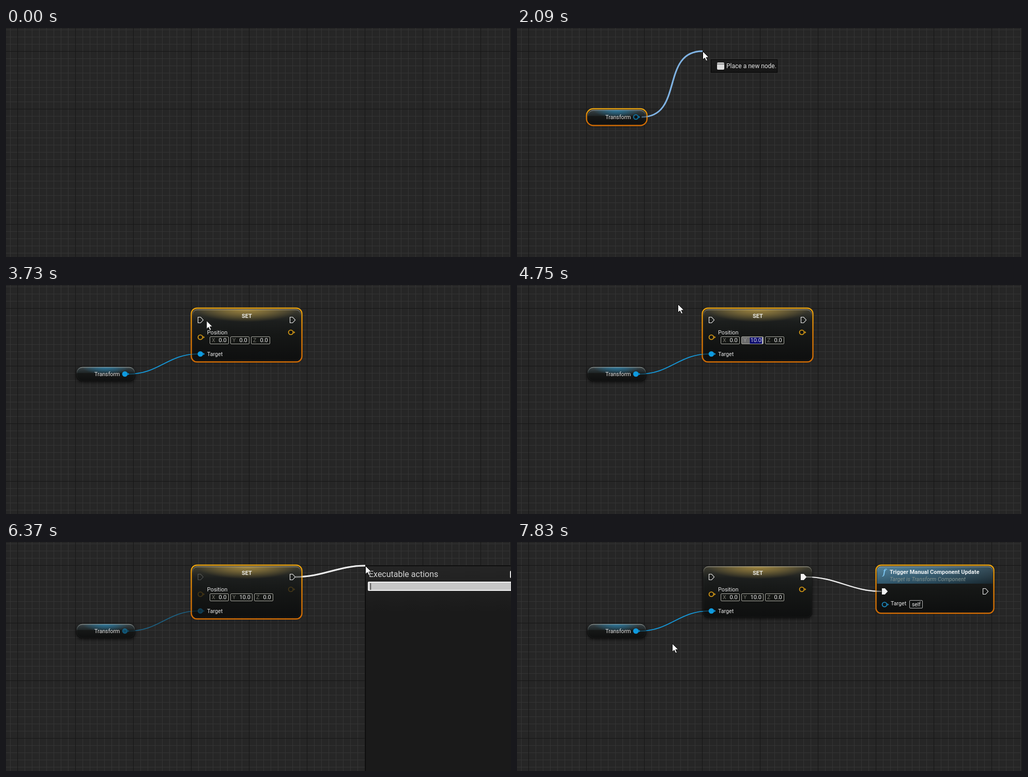
Recreate the animation shown at these times as an HTML page with a canvas. Size 977x445 px, loop 8 s.

```html
<!DOCTYPE html>
<html lang="en">
<head>
<meta charset="utf-8">
<title>Node graph</title>
<style>
html, body { margin: 0; width: 100%; height: 100%; overflow: hidden; background: #262626; }
canvas { display: block; }
</style>
</head>
<body>
<canvas id="stage" width="977" height="445"></canvas>
<script>
const W = 977, H = 445, LOOP = 8000;
const ctx = document.getElementById('stage').getContext('2d');
const SANS = 'Roboto, "Open Sans", sans-serif';
const BLUE = '#0f9ade', GOLD = '#cf9416', WHITE = '#f2f2f2';

// The screen updates in discrete ticks of roughly 205 ms.
const TICKS = [0, 220, 420, 630, 840, 1050, 1270, 1470, 1680, 1880, 2090, 2290,
  2490, 2700, 2920, 3120, 3310, 3510, 3730, 3930, 4140, 4340, 4550, 4750,
  4950, 5160, 5370, 5570, 5780, 5990, 6170, 6380, 6590, 6790, 6990, 7210,
  7420, 7630, 7830];

// Pointer path: tick, x, y
const PATH = [[1, 2, 118], [4, 146, 157], [5, 146, 157], [7, 232, 173],
  [10, 359, 45], [11, 359, 45], [13, 313, 32], [17, 313, 32], [19, 462, 106],
  [22, 462, 106], [23, 311, 37], [26, 554, 68], [29, 695, 46], [30, 695, 46],
  [32, 670, 35], [35, 670, 35], [38, 300, 197]];

const QUERY_A = { 11: '', 12: 's', 13: 'set p', 14: 'set posi', 15: 'set posi' };
const QUERY_B = { 30: '', 31: 'm', 32: 'man', 33: 'manu', 34: 'manual' };

function pointerAt(tick) {
  let i = 0;
  while (i < PATH.length - 2 && PATH[i + 1][0] < tick) i++;
  const [ta, xa, ya] = PATH[i], [tb, xb, yb] = PATH[i + 1];
  const u = Math.min(1, Math.max(0, (tick - ta) / (tb - ta)));
  const k = u * u * (3 - 2 * u);
  return [xa + (xb - xa) * k, ya + (yb - ya) * k];
}

function rect(x, y, w, h, color) {
  ctx.fillStyle = color;
  ctx.fillRect(x, y, w, h);
}

function roundPath(x, y, w, h, r) {
  ctx.beginPath();
  ctx.roundRect(x, y, w, h, r);
}

function poly(points, fill, stroke, width = 1) {
  ctx.beginPath();
  points.forEach(([x, y]) => ctx.lineTo(x, y));
  ctx.closePath();
  if (fill) { ctx.fillStyle = fill; ctx.fill(); }
  if (stroke) { ctx.strokeStyle = stroke; ctx.lineWidth = width; ctx.stroke(); }
}

function text(str, x, y, size, color, style = '') {
  ctx.font = `${style} ${size}px ${SANS}`;
  ctx.fillStyle = color;
  ctx.fillText(str, x, y);
  return ctx.measureText(str).width;
}

function vertical(y0, y1, ...colors) {
  const g = ctx.createLinearGradient(0, y0, 0, y1);
  colors.forEach((c, i) => g.addColorStop(i / (colors.length - 1), c));
  return g;
}

function grid() {
  rect(0, 0, W, H, '#262626');
  for (let x = 8; x < W; x += 14) rect(x, 0, 1, H, '#343434');
  for (let y = 3; y < H; y += 14) rect(0, y, W, 1, '#343434');
  for (let x = 22; x < W; x += 112) rect(x, 0, 1, H, '#161616');
  for (let y = 45; y < H; y += 112) rect(0, y, W, 1, '#161616');
  rect(975, 0, 2, H, '#1e1e1e');
}

function wire([x0, y0], [x1, y1], color, width, alpha = 1) {
  const d = (Math.abs(x1 - x0) + Math.abs(y1 - y0)) / 3;
  ctx.save();
  ctx.globalAlpha = alpha;
  ctx.beginPath();
  ctx.moveTo(x0, y0);
  ctx.bezierCurveTo(x0 + d, y0, x1 - d, y1, x1, y1);
  ctx.strokeStyle = color;
  ctx.lineWidth = width;
  ctx.stroke();
  ctx.restore();
}

function body(x, y, w, h, r, selected, paintTop) {
  ctx.save();
  ctx.shadowColor = 'rgba(0,0,0,.75)';
  ctx.shadowBlur = 6;
  ctx.shadowOffsetY = 2;
  roundPath(x, y, w, h, r);
  ctx.fillStyle = vertical(y, y + h, 'rgba(36,39,38,.92)', 'rgba(22,24,23,.9)', 'rgba(14,15,15,.92)');
  ctx.fill();
  ctx.restore();

  ctx.save();
  roundPath(x, y, w, h, r);
  ctx.clip();
  paintTop();
  ctx.restore();

  roundPath(x + .5, y + .5, w - 1, h - 1, r);
  ctx.strokeStyle = vertical(y, y + h, 'rgba(8,8,8,.4)', '#0a0a0a');
  ctx.lineWidth = 1;
  ctx.stroke();
  roundPath(x + 1, y + 1, w - 2, h - 2, r);
  ctx.strokeStyle = vertical(y, y + Math.min(h, 14), 'rgba(215,215,205,.75)', 'rgba(150,150,150,.08)');
  ctx.stroke();

  if (selected) {
    roundPath(x - 1.5, y - 2, w + 3, h + 4.5, r + 2);
    ctx.strokeStyle = vertical(y, y + h, '#e5a011', '#d87a05', '#cd6a04');
    ctx.lineWidth = 2.4;
    ctx.stroke();
  }
}

function glow(cx, y, rx, ry, color) {
  ctx.save();
  ctx.translate(cx, y);
  ctx.scale(rx, ry);
  const g = ctx.createRadialGradient(0, 0, 0, 0, 0, 1);
  g.addColorStop(0, `rgba(${color},.85)`);
  g.addColorStop(.5, `rgba(${color},.45)`);
  g.addColorStop(1, `rgba(${color},0)`);
  rect(-1, 0, 2, 1, g);
  ctx.restore();
}

function faded(alpha, draw) {
  ctx.save();
  ctx.globalAlpha = alpha;
  draw();
  ctx.restore();
}

function dataPin(x, y, color, filled) {
  ctx.beginPath();
  ctx.arc(x, y, 4.4, 0, 7);
  ctx.fillStyle = filled ? color : '#101414';
  ctx.fill();
  ctx.strokeStyle = color;
  ctx.lineWidth = 1.9;
  ctx.stroke();
  poly([[x + 5.5, y - 2.5], [x + 8.5, y], [x + 5.5, y + 2.5]], color);
}

function execPin(x, y, filled) {
  poly([[x, y - 5.5], [x + 5, y - 5.5], [x + 10, y], [x + 5, y + 5.5], [x, y + 5.5]],
    filled ? WHITE : null, WHITE, 1.1);
}

function getterNode(selected, connected, alpha) {
  body(136, 159, 114, 28, 11, selected, () => {
    rect(136, 159, 114, 12, vertical(159, 171, 'rgba(110,135,145,.35)', 'rgba(70,100,115,.15)'));
    glow(193, 159, 46, 15, '38,128,172');
  });
  text('Transform', 171, 177, 10.7, '#e8e8e8');
  faded(alpha, () => dataPin(230, 173, BLUE, connected));
}

function fields(yValue, editing) {
  let x = 394.5;
  for (const [axis, value] of [['X', '0.0'], ['Y', yValue], ['Z', '0.0']]) {
    const active = editing && axis === 'Y';
    ctx.font = `11px ${SANS}`;
    const tw = ctx.measureText(value).width, w = Math.round(21 + tw);
    roundPath(x, 100.5, w, 14, 1.5);
    ctx.fillStyle = active ? '#6c6c6c' : '#141614';
    ctx.fill();
    ctx.strokeStyle = '#a9a9a0';
    ctx.lineWidth = 1;
    ctx.stroke();
    if (active) rect(x + 16, 102, tw + 2, 12, '#05056e');
    text(axis, x + 3.5, 111, 10.7, active ? '#9a9a9a' : '#74746c');
    text(value, x + 17, 111, 11, '#eeeeee');
    if (active) rect(Math.round(x + 18 + tw), 102, 1, 12, '#ffffff');
    x += w + 4;
  }
}

function setterNode(tick, selected, dim) {
  const alpha = dim ? .25 : 1;
  body(360, 47, 211, 100, 9, selected, () => {
    rect(360, 47, 211, 24, vertical(47, 71, 'rgba(130,118,80,.35)', 'rgba(90,85,60,0)'));
    glow(466, 47, 98, 25, '178,148,66');
  });
  text('SET', 456, 64, 11, '#e9e9e4', 'bold');
  text('Position', 389, 96, 10.8, '#e8e8e8');
  text('Target', 389, 138, 10.7, '#e8e8e8');
  faded(alpha, () => {
    execPin(371.5, 68);
    dataPin(376, 101.5, GOLD);
    dataPin(551, 92, GOLD);
    dataPin(376, 134, BLUE, true);
  });
  execPin(549.5, 68, tick >= 35);
  fields(tick < 21 ? '0.0' : tick === 21 ? '10' : '10.0', tick >= 20 && tick < 27);
}

function functionMark(x, y, size) {
  ctx.font = `italic bold ${size}px "Noto Serif", "Liberation Serif", serif`;
  ctx.fillStyle = '#7cc4ee';
  ctx.fillText('f', x, y);
}

function callNode() {
  body(696, 47, 225, 89, 8, true, () => {
    const g = ctx.createLinearGradient(696, 0, 921, 0);
    g.addColorStop(0, '#427590');
    g.addColorStop(.5, '#315a70');
    g.addColorStop(1, '#20333d');
    rect(696, 47, 225, 34, g);
    rect(696, 47, 225, 34, vertical(47, 81, 'rgba(150,190,210,.2)', 'rgba(0,0,0,.25)'));
  });
  functionMark(708, 63, 14);
  text('Trigger Manual Component Update', 721, 62, 11, '#eef2f4', 'bold');
  text('Target is Transform Component', 721, 76, 10.7, '#82918c', 'italic');
  execPin(706.5, 96, true);
  execPin(901.5, 96);
  dataPin(711, 121.5, '#1c86bb');
  text('Target', 723, 123, 10.7, '#e8e8e8');
  roundPath(759.5, 113.5, 25, 15, 1.5);
  ctx.fillStyle = '#101212';
  ctx.fill();
  ctx.strokeStyle = '#b5b5b5';
  ctx.lineWidth = 1;
  ctx.stroke();
  text('self', 764, 125, 10.3, '#eeeeee');
}

function tip(x, y, label, variable) {
  x = Math.round(x + 16);
  y = Math.round(y + 16);
  ctx.font = `12px ${SANS}`;
  const w = Math.round(32 + ctx.measureText(label).width);
  rect(x, y, w, 26, '#050505');
  rect(x + 1, y + 1, w - 2, 24, vertical(y, y + 26, '#1d1d1d', '#151515'));
  if (variable) {
    pill(x + 11, y + 10, BLUE);
  } else {
    roundPath(x + 12, y + 6, 14, 14, 2);
    ctx.fillStyle = '#dcdcdc';
    ctx.fill();
    rect(x + 12, y + 8, 14, 2, '#8d8d8d');
  }
  text(label, x + 30, y + 17, 12, '#e4e4e4');
}

function pill(x, y, color) {
  roundPath(x, y, 14, 6, 3);
  ctx.fillStyle = color;
  ctx.fill();
  rect(x + 2, y + 2.5, 10, 1, 'rgba(60,40,0,.6)');
}

function menuPanel(x, y, w) {
  rect(x, y, w, H - y, '#080808');
  rect(x + 1, y + 1, w - 2, H - y, vertical(y, y + 90, '#252525', '#1a1a1a'));
}

function searchBox(x, y, w, query) {
  roundPath(x, y, w, 18, 2);
  ctx.fillStyle = '#f0f0f0';
  ctx.fill();
  rect(x + 2, y + 2, w - 4, 14, '#c6c6c6');
  const tw = text(query, x + 5, y + 13, 12, '#101010');
  rect(Math.round(x + 5 + tw), y + 3, 1, 13, '#000000');
}

function header(label, x, y) {
  poly([[x - 2, y - 3], [x - 2, y + 3], [x - 8, y + 3]], '#9c9c9c');
  text(label, x, y + 4.5, 12, '#e2e2e2', 'bold');
}

// Entry label with the matching part lit green.
function entry(label, start, length, x, y, selected) {
  const ink = selected ? '#0c0c0c' : '#dedede';
  ctx.font = `12.75px ${SANS}`;
  const before = ctx.measureText(label.slice(0, start)).width;
  const hit = label.slice(start, start + length);
  const hw = ctx.measureText(hit).width;
  rect(x + before, y - 8, hw, 16, '#289000');
  text(label.slice(0, start), x, y + 4.5, 12.75, ink);
  text(hit, x + before, y + 4.5, 12.75, '#f0f0f0');
  text(label.slice(start + length), x + before + hw, y + 4.5, 12.75, ink);
}

function checkbox(x, y) {
  roundPath(x, y, 14, 14, 2);
  ctx.fillStyle = '#dddddd';
  ctx.fill();
  ctx.beginPath();
  ctx.moveTo(x + 3, y + 7);
  ctx.lineTo(x + 6, y + 10.5);
  ctx.lineTo(x + 11.5, y + 3);
  ctx.strokeStyle = '#151515';
  ctx.lineWidth = 2;
  ctx.stroke();
}

function pinMenu(query) {
  menuPanel(359, 45, 410);
  ctx.beginPath();
  ctx.arc(371.5, 71.5, 5.5, 0, 7);
  ctx.fillStyle = '#2b9fdd';
  ctx.fill();
  text('Actions taking a(n) Transform', 382, 67, 16, '#d4d4d4');
  text('Component Object Reference', 382, 86, 16, '#d4d4d4');
  checkbox(639, 64);
  text('Context Sensitive', 656, 75, 12, '#d4d4d4');
  poly([[754, 67], [759, 71], [754, 75]], '#8a8a8a');
  searchBox(364, 95, 400, query);
  if (!query) return;
  ctx.beginPath();
  ctx.moveTo(751, 99); ctx.lineTo(760, 108);
  ctx.moveTo(760, 99); ctx.lineTo(751, 108);
  ctx.strokeStyle = '#111111';
  ctx.lineWidth = 2;
  ctx.stroke();
  header('Variables', 374, 124);
  header('Transform Component', 384, 142);
  rect(364, 152, 400, 19, '#8a8a8a');
  pill(397, 158, '#d3a21c');
  entry('Set Position', 0, query.length, 415.5, 161.5, true);
}

function execMenu(query) {
  menuPanel(695, 46, 410);
  text('Executable actions', 702, 68, 16, '#d4d4d4');
  checkbox(975, 56);
  searchBox(700, 77, 400, query);
  if (!query) return;
  const call = 'Trigger Manual Component Update';
  const groups = [['Heartbeat Receiver', [' (Heartbeat Receiver)']],
    ['Heartbeat Sender', [' (Heartbeat Sender)']],
    ['Position', [' (Position)']],
    ['Transform', ['', ' (Transform)']]];
  let y = 105.5;
  for (const [name, suffixes] of groups) {
    header(name + ' Component', 710, y);
    for (const suffix of suffixes) {
      y += 20;
      if (!suffix) rect(700, y - 10, 277, 20, '#8a8a8a');
      functionMark(727, y + 5, 16);
      entry(call + suffix, 8, query.length, 741, y, !suffix);
    }
    y += 18;
  }
}

function pointer(x, y) {
  const arrow = [[0, 0], [0, 16], [3.7, 12.6], [6.4, 18.4], [9, 17.2], [6.4, 11.6], [11.5, 11.4]];
  poly(arrow.map(([dx, dy]) => [x + .5 + dx, y + .5 + dy]), '#ffffff', '#111111', 1);
}

function paint(tick) {
  const [px, py] = pointerAt(tick);
  const dragA = tick >= 8 && tick < 16, dragB = tick >= 27 && tick < 35;
  const wires = [];
  if (dragA) wires.push([[241, 173], tick < 11 ? [px, py] : [359, 45], '#7fb2e2', 3]);
  if (tick >= 16) wires.push([[238, 173], [371, 134], '#1596d6', 1.7, dragB ? .4 : 1]);
  if (dragB) wires.push([[560, 68], tick < 30 ? [px, py] : [695, 46], '#ececec', 3]);
  if (tick >= 35) wires.push([[560, 68], [705, 96], '#ececec', 2.2]);

  grid();
  wires.forEach(w => wire(...w));
  if (tick >= 5) getterNode(tick < 16, tick >= 16, dragA ? .75 : dragB || tick === 35 ? .4 : 1);
  if (tick >= 16) setterNode(tick, tick < 35, dragB);
  if (tick >= 35) callNode();
  wires.forEach(([a, b, color, width, alpha = 1]) => wire(a, b, color, width, alpha * .45));

  if (tick in QUERY_A) pinMenu(QUERY_A[tick]);
  if (tick in QUERY_B) execMenu(QUERY_B[tick]);
  if (tick >= 1 && tick < 5) tip(px, py, 'Transform', true);
  if ((dragA && tick < 11) || (dragB && tick < 30)) tip(px, py, 'Place a new node.');
  if (tick >= 1) pointer(px, py);
}

function play() {
  const t = performance.now() % LOOP;
  let tick = TICKS.length - 1;
  while (TICKS[tick] > t) tick--;
  paint(tick);
  requestAnimationFrame(play);
}
play();
</script>
</body>
</html>
```
